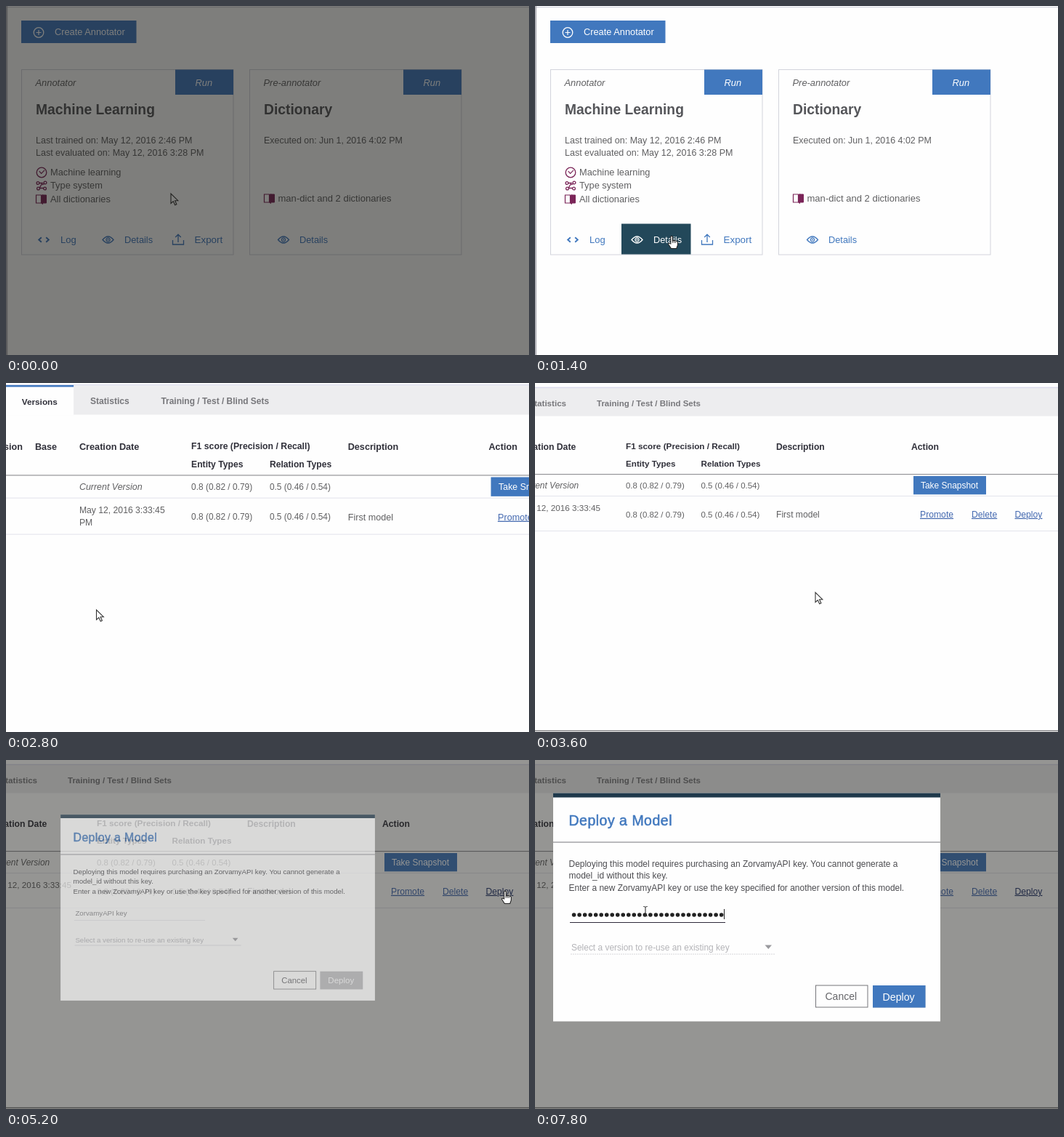
Write an HTML page that moves like this. It is 720 px wide and 480 px high and loops after 8 s.

```html
<!DOCTYPE html>
<html lang="en">
<head>
<meta charset="utf-8">
<title>Deploy a model</title>
<style>
  html, body { margin: 0; width: 100%; height: 100%; overflow: hidden; background: #fefefe; }
  svg { display: block; width: 720px; height: 480px; }
  text { font-family: "Liberation Sans", Arial, sans-serif; white-space: pre; }
</style>
</head>
<body>
<svg id="stage" viewBox="0 0 720 480" xmlns="http://www.w3.org/2000/svg"></svg>
<script>
const BLUE = '#4178be', LINK = '#4469b0', INK = '#606062', PLUM = '#7b2558', DARK = '#30303a', PAPER = '#fefefe';
const SERVICE = 'ZorvamyAPI';

// Markup helpers; text y is the middle of the capitals
const text = (x, y, str, size, fill, attrs = '') =>
  `<text x="${x}" y="${y + size * 0.355}" font-size="${size}" fill="${fill}" ${attrs}>${str}</text>`;
const bold = (x, y, str, size, fill) => text(x, y, str, size, fill, 'font-weight="700"');
const medium = (x, y, str, size, fill) =>
  text(x, y, str, size, fill, `stroke="${fill}" stroke-width=".55" letter-spacing=".5"`);
const ital = (x, y, str, size, fill) => text(x, y, str, size, fill, 'font-style="italic"');
const rect = (x, y, w, h, fill, attrs = '') =>
  `<rect x="${x}" y="${y}" width="${w}" height="${h}" fill="${fill}" ${attrs}/>`;
const path = (d, stroke, width = 1.2, fill = 'none') =>
  `<path d="${d}" stroke="${stroke}" stroke-width="${width}" fill="${fill}"/>`;
const disc = (x, y, r, stroke, fill = 'none', width = 1.3) =>
  `<circle cx="${x}" cy="${y}" r="${r}" stroke="${stroke}" stroke-width="${width}" fill="${fill}"/>`;
const group = (id, body, attrs = '') => `<g id="${id}" ${attrs}>${body}</g>`;
const at = (x, y, body) => `<g transform="translate(${x} ${y})">${body}</g>`;

const eye = (x, y, c) => at(x, y,
  path('M-7.5 0Q0 -9 7.5 0Q0 9 -7.5 0Z', c, 1.3) + disc(0, 0, 2.6, c) + disc(0, 0, 0.8, c, c, 0.5));
const book = (x, y) => at(x, y,
  path('M-7 -5.5H0V5.5H-7Z', PLUM, 1.2) + path('M0 -4.5L2 -6V7L0 5.5ZM2 -5.5H7V5.5H2Z', PLUM, 1, PLUM));
const clock = (x, y) => at(x, y, disc(0, 0, 6.8, PLUM) + path('M-3.3 -1.8L-.4 1.4L4 -3.2', PLUM));
const nodes = (x, y) => at(x, y,
  path('M-4 -3.5H1L-3 3.5H4M1 -1L5 -4', PLUM, 1.4) +
  [[-5, -3.5], [5, -4], [-4.5, 4], [4.5, 4]].map(p => disc(p[0], p[1], 1.9, PLUM, PAPER)).join(''));
const tray = (x, y) => at(x, y, path('M-7.5 1V7H7.5V1M0 4V-6.5M-3.8 -3L0 -6.8L3.8 -3', BLUE, 1.3));
const chevrons = (x, y) => at(x, y, path('M-3.2 -3.2L-6.8 0L-3.2 3.2M3.2 -3.2L6.8 0L3.2 3.2', BLUE, 1.9));

const card = (x, w, kind, title) =>
  rect(x + 0.5, 87.5, w, 254.5, PAPER, 'stroke="#d3d4dc"') +
  rect(x + w - 79.5, 87.5, 80, 34.5, BLUE) +
  ital(x + 19.5, 105.5, kind, 12.9, INK) +
  ital(x + w - 52, 105.5, 'Run', 12.9, '#fff') +
  bold(x + 20, 142.5, title, 19.3, '#55565a');

function listPage() {
  return rect(0, 0, 720, 480, PAPER) + rect(0, 1, 720, 1.2, '#d4d5de') + rect(0, 0, 2.2, 480, '#b4b4ba') +
    rect(21, 20, 158.5, 31, BLUE) +
    disc(45, 36.5, 6.8, '#fff') + path('M41.5 36.5H48.5M45 33V40', '#fff') +
    text(67, 35.5, 'Create Annotator', 12.8, '#fff') +
    card(21, 291.5, 'Annotator', 'Machine Learning') +
    text(41, 184.5, 'Last trained on: May 12, 2016 2:46 PM', 12.5, INK) +
    text(41, 202, 'Last evaluated on: May 12, 2016 3:28 PM', 12.5, INK) +
    clock(49, 229) + text(61, 228.5, 'Machine learning', 12.8, INK) +
    nodes(49, 247) + text(61, 246.5, 'Type system', 12.8, INK) +
    book(48.5, 265.5) + text(61, 265, 'All dictionaries', 12.85, INK) +
    chevrons(52, 321.5) + text(75, 321, 'Log', 13, BLUE) +
    eye(140.5, 321.5, BLUE) + text(163, 321, 'Details', 12.8, BLUE) +
    tray(237, 321) + text(259.5, 321, 'Export', 13.4, BLUE) +
    group('hover', rect(119, 299.5, 95.5, 42, '#23485a') +
      eye(140.5, 321.5, '#fff') + text(163, 321, 'Details', 12.8, '#fff')) +
    card(335, 291.5, 'Pre-annotator', 'Dictionary') +
    text(355, 184.5, 'Executed on: Jun 1, 2016 4:02 PM', 12.45, INK) +
    book(362.5, 264.5) + text(374.5, 264, 'man-dict and 2 dictionaries', 13.05, INK) +
    eye(382, 321.5, BLUE) + text(404, 321, 'Details', 12.8, BLUE);
}

// Laid out in the coordinates of the view after the pan
function tablePage() {
  const link = (x, str, id) => text(x, 180.5, str, 12.2, LINK, `id="${id}" text-decoration="underline"`);
  const scores = y => text(125, y, '0.8 (0.82 / 0.79)', 11.45, INK) + text(228.5, y, '0.5 (0.46 / 0.54)', 11.45, INK);
  return rect(-200, -10, 1000, 600, PAPER) +
    rect(-176, 5.6, 1000, 1.4, '#d9daea') + rect(-176, 7, 1000, 38.5, '#ededef') +
    rect(-121, 6.5, 90.5, 40, PAPER) + rect(-121, 6.5, 90.5, 2.4, BLUE) +
    bold(-99, 28.3, 'Versions', 11.3, DARK) +
    bold(-8.5, 27.7, 'Statistics', 11.6, '#77777b') +
    bold(85, 27.7, 'Training / Test / Blind Sets', 11.5, '#77777b') +
    bold(-141.5, 87.3, 'Version', 12.1, DARK) + bold(-81.5, 87.3, 'Base', 12.1, DARK) +
    bold(-23, 87.3, 'Creation Date', 12.2, DARK) +
    bold(125, 87.3, 'F1 score (Precision / Recall)', 11.77, DARK) +
    bold(332, 87.3, 'Description', 12.15, DARK) + bold(518, 87.3, 'Action', 12.2, DARK) +
    bold(125, 110.7, 'Entity Types', 11.7, DARK) + bold(228.5, 110.7, 'Relation Types', 11.65, DARK) +
    rect(-156, 125, 900, 1.1, '#8f8f94') +
    rect(-156, 155, 900, 1, '#e3e4ec') + rect(-156, 203, 900, 1, '#e3e4ec') +
    ital(-23, 140.7, 'Current Version', 11.95, INK) + scores(140.7) +
    text(-23, 171.7, 'May 12, 2016 3:33:45', 11.7, INK) + text(-23, 188, 'PM', 11.7, INK) + scores(180.5) +
    text(332, 180.5, 'First model', 12.1, INK) +
    rect(521, 128, 100, 25.3, BLUE) + text(531, 140.7, 'Take Snapshot', 11.95, '#fff') +
    link(530, 'Promote', 'promote') + link(601, 'Delete', 'delete') + link(660.5, 'Deploy', 'deployLink') +
    rect(-177, -10, 2.4, 600, '#b4b4ba') + rect(-176, 477.7, 1000, 1.4, '#77777b');
}

function dialog() {
  const size = 11.97;
  const dots = Array.from({ length: 28 }, (_, i) => disc(53.6 + i * 7.52, 213, 2.8, 'none', '#222')).join('');
  return rect(25, 45.5, 533, 315, PAPER, 'id="sheet"') + rect(25, 45.5, 533, 6, '#1f394b') +
    medium(46.5, 83.5, 'Deploy a Model', 19.5, BLUE) + rect(25, 112.5, 533, 1.1, '#85858a') +
    text(46.5, 142.3, `Deploying this model requires purchasing an ${SERVICE} key. You cannot generate a`, size, '#4c4c50') +
    text(46.5, 158.7, 'model_id without this key.', size, '#4c4c50') +
    text(46.5, 175.3, `Enter a new ${SERVICE} key or use the key specified for another version of this model.`, size, '#4c4c50') +
    group('hint', text(50, 212.7, SERVICE + ' key', size, '#808084')) +
    rect(48, 224, 222, 1, '#e4e4e8', 'id="idleLine"') +
    rect(48, 223, 214, 1, '#2e2a3a', 'id="focusLine"') +
    group('dots', dots) + rect(260, 205, 1, 14, '#222', 'id="caret"') +
    text(50, 257.3, 'Select a version to re-use an existing key', 11.95, '#b4b4b8') +
    `<path id="selectLine" d="M49 267H331" stroke="#d6d6da"/>` +
    path('M316.5 254.5H326L321.3 260Z', 'none', 0, '#9a9a9e') +
    group('buttons',
      rect(386.5, 311, 71.5, 30, PAPER, 'stroke="#77777b"') + text(399.5, 326.5, 'Cancel', 14, '#66666a') +
      rect(465, 311, 72.5, 30.5, '#bababd') +
      rect(465, 311, 72.5, 30.5, BLUE, 'id="active"') + text(478.5, 326.5, 'Deploy', 14.2, '#fff'));
}

const cursors =
  group('arrow', path('M0 0V13.5L3.3 10.6L5.7 15.8L7.9 14.8L5.6 9.7H9.8Z', '#333', 1.1, '#fff')) +
  group('hand', path('M-1.2 1.2Q0 -.6 1.4 1.2V7L3.6 6.4L5.6 7L7.4 7.3L8.4 9V13L6.8 17.5H-.6L-4.6 11.2Q-4.6 9.4 -1.2 11Z', '#222', 1.1, '#fff') +
    path('M1.4 7V10M3.6 7V10M5.6 7.6V10', '#222', 0.8)) +
  group('beam', path('M-2.8 -6.5Q0 -6.5 0 -5V5Q0 6.5 -2.8 6.5M2.8 -6.5Q0 -6.5 0 -5M0 5Q0 6.5 2.8 6.5', '#333', 1.1));

const stage = document.getElementById('stage');
stage.innerHTML =
  group('list', listPage()) + group('table', tablePage()) +
  rect(0, 0, 720, 480, '#1e1e1b', 'id="shade"') + group('dialog', dialog()) +
  group('cursor', cursors) + rect(0, 0, 720, 480, '#141410', 'id="fade"');

const el = {};
stage.querySelectorAll('[id]').forEach(node => { el[node.id] = node; });
const alpha = (id, v) => el[id].setAttribute('opacity', v);
const show = (id, on) => el[id].setAttribute('visibility', on ? 'inherit' : 'hidden');
const move = (id, value) => el[id].setAttribute('transform', value);

// Linear interpolation through [time, value, ...] keys
function track(t, keys) {
  if (t <= keys[0][0]) return keys[0].slice(1);
  for (let i = 1; i < keys.length; i++) {
    const a = keys[i - 1], b = keys[i];
    if (t < b[0]) return a.slice(1).map((v, j) => v + (b[j + 1] - v) * (t - a[0]) / (b[0] - a[0]));
  }
  return keys[keys.length - 1].slice(1);
}

const POINTER = [
  [1200, 227, 258], [1400, 188, 316], [2400, 188, 316], [2800, 124.5, 312], [3000, 160, 308],
  [3400, 355, 291], [3600, 386, 288], [3800, 440, 270], [4200, 660, 192], [4400, 687, 180],
  [5800, 687, 180], [6000, 430, 190], [6200, 184.5, 200], [6400, 158, 206], [6600, 152, 208]
];

function draw(t) {
  alpha('fade', 0.54 * Math.max(0, 1 - t / 1000));
  show('hover', t >= 1400);
  show('list', t < 2000);
  alpha('table', t < 1800 ? 0 : t < 2000 ? 0.5 : 1);

  const left = 1 - track(t, [[2400, 0], [3600, 1]])[0];
  move('table', `translate(${187.3 * left} ${-5.78 * left}) scale(${1 + 0.0625 * left})`);
  el.deployLink.setAttribute('fill', t >= 4400 ? '#25366c' : LINK);

  alpha('shade', track(t, [[4600, 0], [5200, 0.47]])[0]);
  alpha('dialog', track(t, [[4800, 0], [5200, 0.65], [5600, 1]])[0]);
  const size = track(t, [[4800, 0.62], [5200, 0.812], [5800, 1]])[0];
  move('dialog', `translate(291.5 203) scale(${size}) translate(-291.5 -203)`);

  const focused = t >= 6600, filled = t >= 6800;
  show('hint', !filled);
  show('dots', filled);
  show('idleLine', !focused);
  show('focusLine', focused);
  show('caret', filled && !(t >= 7400 && t < 7800));
  el.selectLine.setAttribute('stroke-dasharray', focused ? '2 1' : 'none');
  el.sheet.setAttribute('height', focused ? 314 : 315);
  move('buttons', `translate(0 ${focused ? -1 : 0})`);
  alpha('active', track(t, [[6600, 0], [7200, 1]])[0]);

  const [x, y] = track(t, POINTER);
  move('cursor', `translate(${x} ${y})`);
  const hand = (t >= 1400 && t < 2000) || (t >= 4400 && t < 6000), beam = t >= 6400;
  show('hand', hand);
  show('beam', beam);
  show('arrow', !hand && !beam);
}

function frame(now) {
  draw(Math.floor((now % 8000) / 200) * 200);
  requestAnimationFrame(frame);
}
draw(0);
requestAnimationFrame(frame);
</script>
</body>
</html>
```
